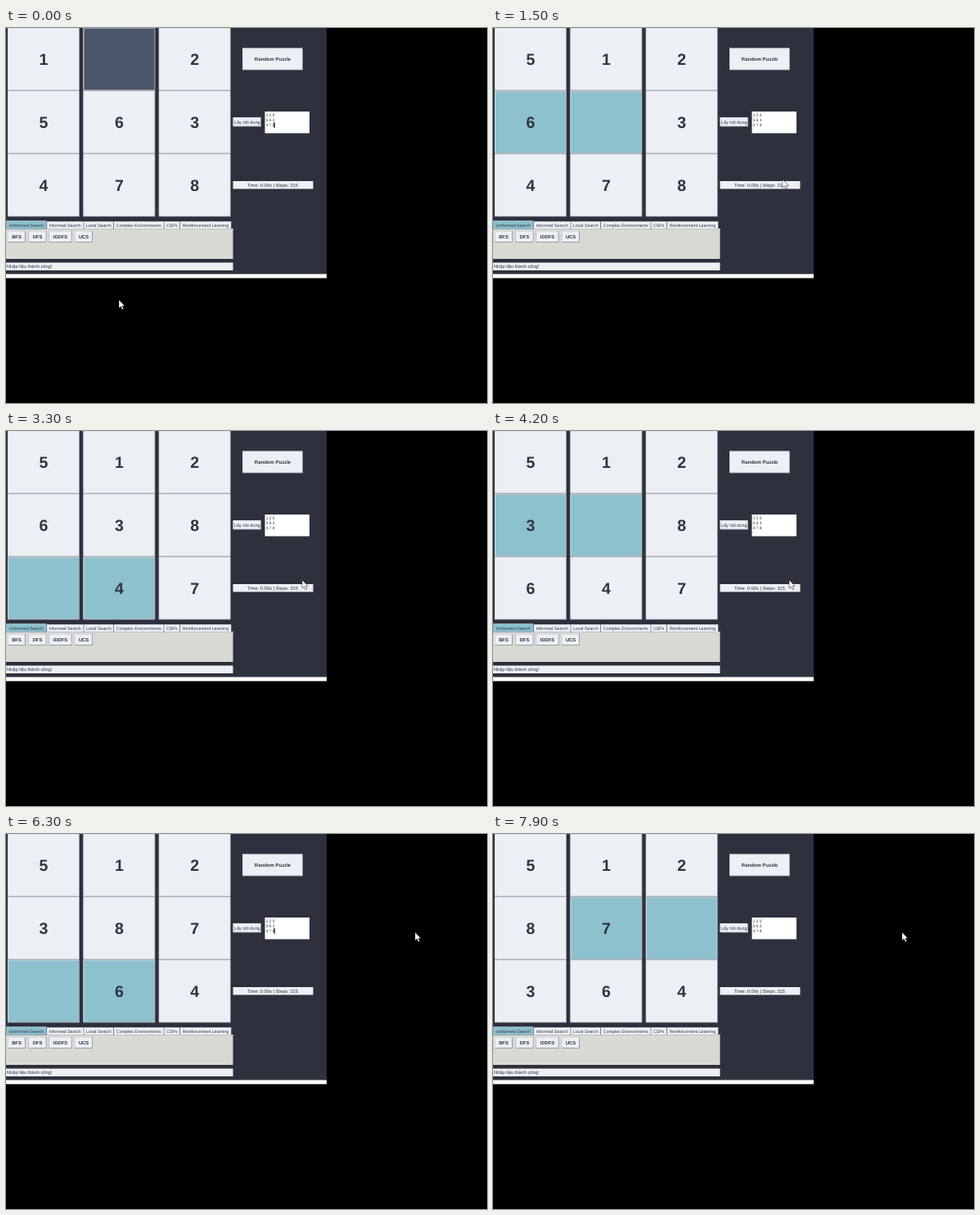
Animation, 588 px wide and 458 px high, one loop 8000 ms. Source, as an HTML page:

```html
<!DOCTYPE html>
<html lang="vi">
<head>
<meta charset="utf-8">
<title>Eight puzzle solver</title>
<style>
html, body { margin: 0; width: 100%; height: 100%; overflow: hidden; background: #000; }
svg { display: block; }
text { font-family: "Liberation Sans", Arial, sans-serif; fill: #2e3440; text-rendering: geometricPrecision; }
.bold { font-weight: 700; }
.mid { text-anchor: middle; }
</style>
</head>
<body>
<svg id="stage" width="588" height="458" viewBox="0 0 588 458"></svg>
<script>
const stage = document.getElementById('stage');
const PALE = '#eceff4', TEAL = '#8dc1cd', SLATE = '#4c566a', NIGHT = '#2e313d';
const LOOP = 8000, TICK = 100;

function add(tag, attrs, label) {
  const el = document.createElementNS('http://www.w3.org/2000/svg', tag);
  for (const k in attrs) el.setAttribute(k, attrs[k]);
  if (label) el.textContent = label;
  return stage.appendChild(el);
}
const box = (x, y, width, height, fill) => add('rect', { x, y, width, height, fill });
const write = (x, y, size, label, cls = '') => add('text', { x, y, 'font-size': size, class: cls }, label);

// Raised widget: grey rim, light upper left edge; returns its face
function raised(x, y, w, h, fill) {
  box(x, y, w, h, '#9a9da4');
  box(x, y, w - 1, h - 1, '#d9dce1');
  return box(x + 1, y + 1, w - 2, h - 2, fill);
}
function button(x, y, w, h, label, size, cls) {
  raised(x, y, w, h, PALE);
  write(x + w / 2, y + h / 2 + size * 0.36, size, label, cls);
}

box(0, 0, 392, 301, NIGHT);
box(0, 300.5, 392, 5, '#fffffa');

// Board
const cells = [];
for (let i = 0; i < 9; i++) {
  const x = 2 + (i % 3) * 92.4, y = Math.floor(i / 3) * 77 - 0.5;
  const face = raised(x, y, 88, 77, PALE);
  const digit = write(x + 44, y + 45.8, 19.5, ' ', 'bold mid');
  cells.push({ face, digit });
}

// Controls on the right
button(289, 24.5, 74, 27, 'Random Puzzle', 6, 'bold mid');
button(277.5, 109, 34.5, 11.5, 'Lấy nội dung', 5.5, 'mid');
box(316.5, 102, 54.5, 26.5, '#fff');
['1 2 0', '5 6 3', '4 7 8'].forEach((row, i) => write(317.8, 107.9 + i * 6.2, 4.8, row));
const caret = box(327.5, 115, 1.2, 7, '#111');
box(277.5, 187, 98, 9.5, PALE);
write(326, 193.9, 5.75, 'Time: 0.00s | Steps: 315', 'mid');

// Tabs
box(0, 245, 277.5, 37, '#dad8d3');
box(0, 245, 277.5, 1, '#f0efec');
[[0, 49.5, 'Uniformed Search'], [49.5, 45.5, 'Informed Search'], [95, 36.5, 'Local Search'],
 [131.5, 61.5, 'Complex Environments'], [193, 19.5, 'CSPs'], [212.5, 63, 'Reinforcement Learning']
].forEach(([x, w, label], i) => {
  const y = i ? 236 : 235;
  box(x, y, w, 246 - y, '#8f939b');
  box(x + 0.5, y + 0.5, w - 1, 245 - y, i ? PALE : TEAL);
  write(x + w / 2, 242.9, 5.3, label, 'mid');
});
[[2, 22, 'BFS'], [27.5, 22, 'DFS'], [52.5, 28, 'IDDFS'], [84, 22, 'UCS']]
  .forEach(([x, w, label]) => button(x, 248, w, 14, label, 5.8, 'bold mid'));

box(0, 286.5, 277.5, 9.5, PALE);
write(1, 293.4, 5.7, 'Nhập liệu thành công!');

const cursor = add('path', {
  d: 'M0 0V10.2L2.3 8L4 11.8L5.7 11L4.1 7.4H7.2Z',
  fill: '#fff', stroke: '#111', 'stroke-width': 0.5
});

// Blank tile moves and the boards they lead to
const STEP = { L: -1, R: 1, U: -3, D: 3 };
const boards = [{ tiles: [...'1 2563478'], lit: [] }];
for (const move of 'LDRRDLLURRDLLURR') {
  const tiles = [...boards[boards.length - 1].tiles];
  const from = tiles.indexOf(' '), to = from + STEP[move];
  [tiles[from], tiles[to]] = [tiles[to], ' '];
  boards.push({ tiles, lit: [from, to] });
}
const moveTime = k => 200 + 500 * k + (k > 10 ? 100 : 0);

// Pointer stops: time, x, y
const stops = [
  [0, 138, 332], [700, 285, 281], [800, 285, 281], [1500, 354, 185], [1600, 354, 185],
  [2000, 362, 182], [4900, 362, 182], [5200, 398, 137], [5700, 398, 137], [6300, 500, 120], [LOOP, 500, 120]
];
function pointer(t) {
  const i = stops.findIndex(s => s[0] > t);
  const [t0, x0, y0] = stops[i - 1], [t1, x1, y1] = stops[i];
  const p = (t - t0) / (t1 - t0), e = p * p * (3 - 2 * p);
  return [x0 + (x1 - x0) * e, y0 + (y1 - y0) * e];
}

let shown = -1;
function showBoard(n) {
  if (n === shown) return;
  shown = n;
  const { tiles, lit } = boards[n];
  cells.forEach(({ face, digit }, i) => {
    digit.textContent = tiles[i];
    face.setAttribute('fill', lit.includes(i) ? TEAL : tiles[i] === ' ' ? SLATE : PALE);
  });
}

function draw(now) {
  const t = Math.floor((now % LOOP) / TICK) * TICK;
  let n = 0;
  while (n < boards.length - 1 && moveTime(n) <= t) n++;
  showBoard(n);
  caret.setAttribute('visibility', t % 900 < 600 ? 'visible' : 'hidden');
  cursor.setAttribute('transform', `translate(${pointer(t)})`);
}

const start = performance.now();
function loop() {
  draw(performance.now() - start);
  requestAnimationFrame(loop);
}
loop();
</script>
</body>
</html>
```
